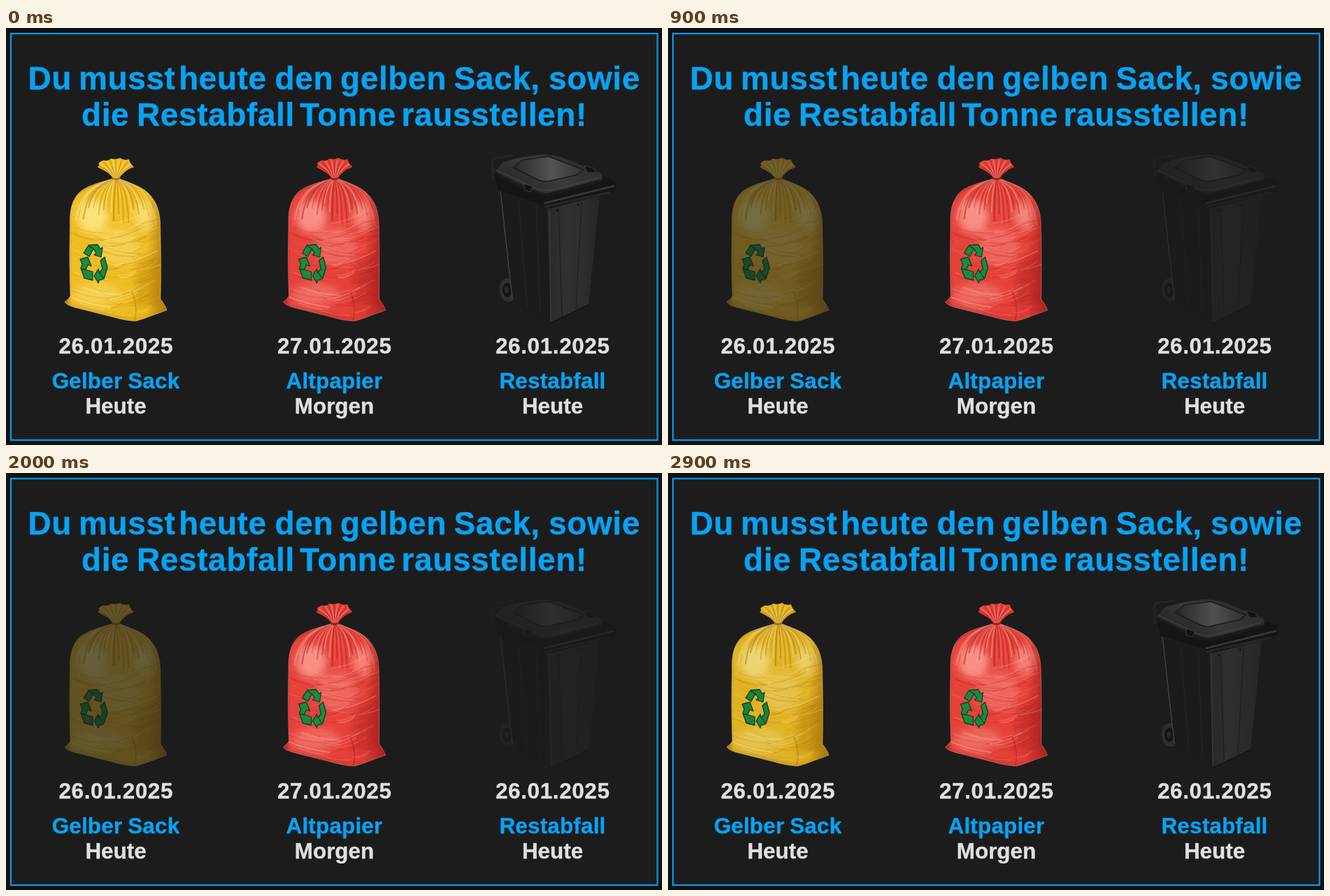
Animation, 938 px wide and 597 px high, one loop 3000 ms. Source, as an HTML page:

```html
<!DOCTYPE html>
<html lang="de">
<head>
<meta charset="utf-8">
<title>Abfallkalender</title>
<style>
  html, body { margin: 0; width: 100%; height: 100%; overflow: hidden; background: #111; }
  svg { display: block; width: 938px; height: 597px; }
  text { font-family: "Liberation Sans", Arial, sans-serif; font-weight: bold; text-anchor: middle; stroke-width: .4px; stroke-linejoin: round; }
  .head { font-size: 46px; letter-spacing: .6px; text-anchor: start; }
  .head, .label { fill: #06a3f5; stroke: #06a3f5; }
  .date, .day { fill: #e0e0e0; stroke: #e0e0e0; }
  .label, .date, .day { font-size: 31.4px; }
  .label { letter-spacing: .2px; word-spacing: -1px; }
  .date { letter-spacing: .65px; }
  .blink { animation: fade 3s infinite steps(15, end); }
  @keyframes fade { 0%, 100% { opacity: 1; } 50% { opacity: 0; } }
</style>
</head>
<body>
<svg viewBox="0 0 938 597">
  <defs>
    <path id="body" d="M152 216C132 222 110 227 101 240C93 251 91 264 91.500 282Q90 335 92 384Q90 388 84 392Q85 396 98 400L150 413Q170 419 186 419.500Q196 417 208 412L230 404Q229 399 221 388Q222 330 220.500 277C219 257 213 246 203 236C192 226 175 221 163 216Z"/>
    <path id="knot" d="M153 215C147 206 138 203 131 199Q135 196 132 194Q138 188 143 190Q147 190 150 187Q157 189 163 186Q168 190 176 188Q177 194 183 199Q170 203 162 215Z"/>
    <clipPath id="inBody"><use href="#body"/></clipPath>
    <clipPath id="inKnot"><use href="#knot"/></clipPath>
    <filter id="soft" x="-30%" y="-30%" width="160%" height="160%"><feGaussianBlur stdDeviation="6"/></filter>
    <g id="recycle" fill="#1b8a3e" stroke="#0b4420" stroke-width="1.300" stroke-linejoin="round">
      <path d="M111 322L118 311L131 310L135 316L138 314L136 328L126 325L129 322L125 316L119 327Z"/>
      <path d="M106 331L117 328L122 341L117 339L114 346L124 349L124 361L112 358L107 344L109 338Z"/>
      <path d="M135 333L141 328L145 343L140 359L133 361L132 365L126 355L132 345L133 350L138 345Z"/>
      <path d="M118 312L125 316M107 345L114 346M139 358L134 350" fill="none"/>
    </g>
    <linearGradient id="lid" x1="0" x2="1" y1=".8" y2=".2">
      <stop stop-color="#222223"/><stop offset=".5" stop-color="#3a3a3c"/><stop offset="1" stop-color="#2b2b2d"/>
    </linearGradient>
    <linearGradient id="top" x1="0" x2="1">
      <stop stop-color="#28282a"/><stop offset=".55" stop-color="#545457"/><stop offset="1" stop-color="#323234"/>
    </linearGradient>
    <linearGradient id="front" x1="0" x2="1">
      <stop stop-color="#29292a"/><stop offset=".35" stop-color="#313133"/><stop offset=".75" stop-color="#2c2c2e"/><stop offset="1" stop-color="#262627"/>
    </linearGradient>
  </defs>

  <rect x="7" y="8" width="924.500" height="582" fill="#1c1c1c" stroke="#0a96e8" stroke-width="2.300"/>
  <text class="head" y="88">
    <tspan x="31.500">Du</tspan><tspan x="104">musst</tspan><tspan x="247">heute</tspan>
    <tspan x="384.500">den</tspan><tspan x="478">gelben</tspan><tspan x="640.500">Sack,</tspan><tspan x="776">sowie</tspan>
  </text>
  <text class="head" y="140">
    <tspan x="108">die</tspan><tspan x="187">Restabfall</tspan><tspan x="420">Tonne</tspan><tspan x="565.500">rausstellen!</tspan>
  </text>

  <g id="yellow" class="blink"></g>
  <g id="red" transform="translate(312.500 0)"></g>

  <g class="blink" stroke-linejoin="round">
    <ellipse cx="718" cy="375" rx="12.500" ry="17" fill="#2f2f31" transform="rotate(-8 718 375)"/>
    <ellipse cx="717" cy="375" rx="7.500" ry="11" fill="#141415" stroke="#38383a"/>
    <ellipse cx="716" cy="375" rx="3" ry="5" fill="#29292a"/>
    <path d="M706 230L777 250L778 422L746 406L725 389Z" fill="#1b1b1c"/>
    <path d="M707 234L724 388" stroke="#48484b" stroke-width="1.300"/>
    <path d="M733 248L745 400M758 254L764 408" stroke="#222224" stroke-width="2"/>
    <path d="M774 254L849 238L833 396L779 422Z" fill="url(#front)"/>
    <path d="M790 258L795 412M823 250L815 402" stroke="#222223" stroke-width="1.500"/>
    <path d="M777 260L779 420" stroke="#3a3a3c" stroke-width="1.500"/>
    <path d="M779 422L833 396" stroke="#161616" stroke-width="1.500"/>
    <path d="M698 207L704 233L764 251L778 258L866 236L872 232L871 219L852 211Z" fill="#151516"/>
    <path d="M769 251L870 226" stroke="#3a3a3c" stroke-width="2.500"/>
    <path d="M770 256L864 235" stroke="#282829" stroke-width="3"/>
    <path d="M697 216L695 190Q697 185 708 185L725 182" fill="none" stroke="#252527" stroke-width="3"/>
    <path d="M698 206L711 192Q735 184 768 181Q785 181 800 187L851 208Q856 214 849 220L779 239Q766 240 755 234Z" fill="url(#lid)"/>
    <path d="M698 207Q724 222 755 234Q768 240 781 237L850 219" fill="none" stroke="#1b1b1c" stroke-width="4"/>
    <path d="M702 204Q730 217 758 230Q770 234 782 231L848 214" fill="none" stroke="#464648" stroke-width="1.200"/>
    <path d="M725 200L738 189L776 184L826 203L818 210L777 219Q768 221 760 217Z" fill="url(#top)" stroke="#1c1c1d" stroke-width="1.500"/>
    <path d="M741 223L753 227L750 235L741 232ZM827 197L839 200L844 207L831 207Z" fill="#141415" stroke="#38383a"/>
    <circle cx="788" cy="261" r="1.500" fill="#141414"/><circle cx="818" cy="253" r="1.500" fill="#141414"/>
  </g>
  <g id="captions"></g>
</svg>

<script>
const $ = id => document.getElementById(id);

function seeded(seed) {
  return () => (seed = (seed * 16807) % 2147483647) / 2147483647;
}

function line(d, color, width, alpha) {
  return `<path d="${d}" stroke="${color}" stroke-width="${width.toFixed(2)}" opacity="${alpha.toFixed(2)}"/>`;
}

// Folds fanning out below the knot
function pleats(rnd, hi, lo) {
  let out = '';
  for (let i = 0; i <= 34; i++) {
    const u = i / 17 - 1;
    const x = 157.5 + u * 61, y = 246 + rnd() * 40;
    const d = `M${157.5 + u * 5} 216C${157.5 + u * 26} 223 ${157.5 + u * 53} 229 ${x} ${y}`;
    out += line(d, i % 2 ? hi : lo, .8 + rnd() * 1.6, .2 + rnd() * .35);
  }
  return out;
}

// Fine creases sweeping across the sack, rising on the right half
function creases(rnd, hi, lo) {
  let out = '';
  for (let i = 0; i < 100; i++) {
    const x = 86 + rnd() * 115, y = 275 + rnd() * 135;
    const w = 22 + rnd() * 38, slope = x > 140 ? -.35 : .2;
    const d = `M${x} ${y}q${w / 2} ${w * slope / 2 + 6} ${w} ${w * slope}`;
    out += line(d, i % 2 ? hi : lo, .6 + rnd() * 1.4, .1 + rnd() * .24);
  }
  return out;
}

function knotFolds(hi, lo) {
  let out = '';
  for (let i = 0; i < 13; i++) {
    const u = i / 6 - 1;
    out += line(`M${157.5 + u * 4} 214Q${157 + u * 9} 204 ${157 + u * 26} ${188 + u * u * 9}`, i % 2 ? hi : lo, 1.4, .5);
  }
  return out;
}

function bag(id, hi, base, lo) {
  const rnd = seeded(4711);
  $(id).innerHTML = `
    <linearGradient id="${id}Side" x1="0" x2="1">
      <stop stop-color="${lo}"/><stop offset=".07" stop-color="${base}"/>
      <stop offset=".8" stop-color="${base}"/><stop offset="1" stop-color="${lo}"/>
    </linearGradient>
    <use href="#knot" fill="${base}"/>
    <g clip-path="url(#inKnot)" fill="none">${knotFolds(hi, lo)}</g>
    <use href="#body" fill="url(#${id}Side)"/>
    <g clip-path="url(#inBody)" fill="none" stroke-linecap="round">
      <g filter="url(#soft)">
        <ellipse cx="124" cy="270" rx="22" ry="24" fill="${hi}" opacity=".75"/>
        <ellipse cx="197" cy="268" rx="14" ry="22" fill="${hi}" opacity=".6"/>
        <ellipse cx="160" cy="312" rx="30" ry="28" fill="${hi}" opacity=".35"/>
        <ellipse cx="130" cy="382" rx="34" ry="16" fill="${hi}" opacity=".4"/>
        <path d="M188 335L226 325V400H184Z" fill="${lo}" opacity=".4"/>
        <path d="M84 402L184 425L232 410" stroke="${lo}" stroke-width="9" opacity=".7"/>
      </g>
      ${pleats(rnd, hi, lo)}${creases(rnd, hi, lo)}
      ${line('M184 418Q189 400 180 378', lo, 1.5, .5)}
      ${line('M92 385Q120 396 150 400', hi, 2, .4)}
    </g>
    <use href="#body" fill="none" stroke="${hi}" opacity=".4"/>
    <path d="M152 215Q157 218 163 215" fill="none" stroke="${lo}" stroke-width="3"/>
    <use href="#recycle"/>`;
}

function caption(x, date, label, day) {
  return `<text class="date" x="${x + .3}" y="466">${date}</text>
    <text class="label" x="${x}" y="516">${label}</text>
    <text class="day" x="${x}" y="552">${day}</text>`;
}

bag('yellow', '#ffec96', '#efbd25', '#b0780c');
bag('red', '#ffaa9e', '#e5423a', '#a81e1c');
$('captions').innerHTML =
  caption(157, '26.01.2025', 'Gelber Sack', 'Heute') +
  caption(469.5, '27.01.2025', 'Altpapier', 'Morgen') +
  caption(781.5, '26.01.2025', 'Restabfall', 'Heute');
</script>
</body>
</html>
```
